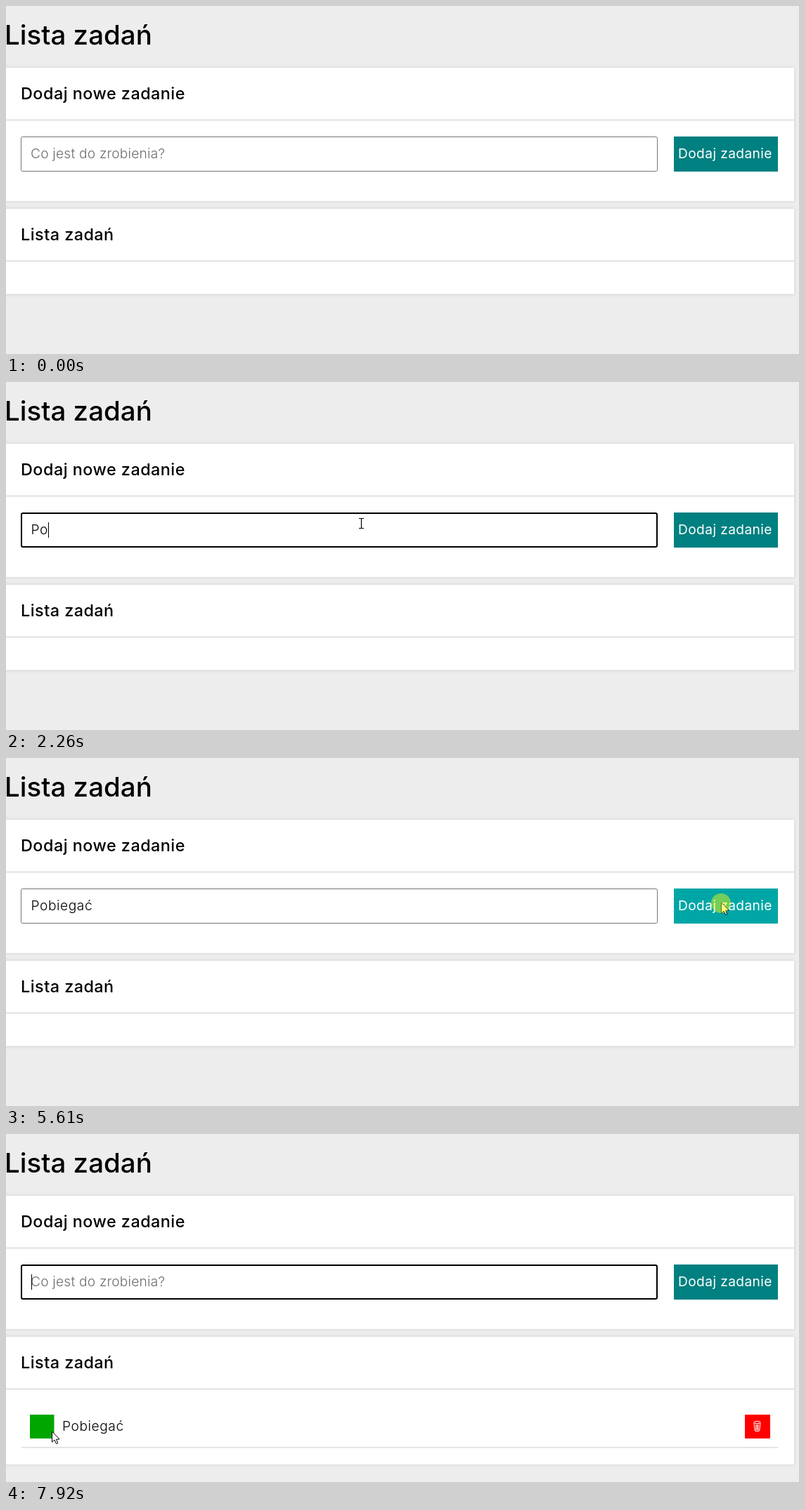
An HTML page with a canvas that plays this animation: 1128x496 px, repeating every 7990 ms.

```html
<!DOCTYPE html>
<html lang="pl">
<head>
<meta charset="utf-8">
<title>Lista zadań</title>
<style>
  html, body { margin: 0; width: 100%; height: 100%; overflow: hidden; background: #ededed; }
  canvas { display: block; }
</style>
</head>
<body>
<canvas id="stage" width="1128" height="496"></canvas>
<script>
const ctx = document.getElementById('stage').getContext('2d');
const LOOP = 7990, BLINK = 530, STEP = 1000 / 15;
const TASK = 'Pobiegać';
const FOCUS = 940, PRESS = 5550, ADDED = 5740;
const KEYS = [1930, 2260, 2860, 2990, 3190, 3320, 3520, 4120];

// Pointer moves: [time, x, y]
const MOVES = [
  [[190, 1078, 477], [400, 860, 376], [620, 600, 236], [780, 515, 188], [930, 505, 201]],
  [[4785, 505, 201], [4930, 625, 192], [5060, 830, 190], [5180, 985, 201], [5265, 1017, 206]],
  [[6600, 1017, 206], [6733, 947, 265], [7060, 590, 372], [7430, 251, 429],
   [7700, 112, 432], [7860, 70, 426], [7920, 65, 424]]
];

const FONTS = {
  title: ['500 38.5px', '0px'],
  head: ['500 23.4px', '0.47px'],
  hint: ['300 19.2px', '0.2px'],
  task: ['300 19.2px', '0.55px'],
  button: ['400 19.2px', '0.38px']
};

function setFont(name) {
  const [font, spacing] = FONTS[name];
  ctx.font = font + ' Inter, sans-serif';
  ctx.letterSpacing = spacing;
}

function text(str, x, y, font, color = '#000') {
  setFont(font);
  ctx.fillStyle = color;
  ctx.fillText(str, x, y);
}

function rect(x, y, w, h, color) {
  ctx.fillStyle = color;
  ctx.fillRect(x, y, w, h);
}

// Smooth curve through timed points
function along(points, t) {
  const last = points.length - 1;
  if (t >= points[last][0]) return points[last].slice(1);
  if (t <= points[0][0]) return points[0].slice(1);
  const i = points.findIndex(p => p[0] > t) - 1;
  const a = points[i], b = points[i + 1], dt = b[0] - a[0], u = (t - a[0]) / dt;
  const slope = (n, k) => {
    const p = points[Math.max(0, n - 1)], q = points[Math.min(last, n + 1)];
    return (q[k] - p[k]) / (q[0] - p[0]);
  };
  const u2 = u * u, u3 = u2 * u;
  return [1, 2].map(k =>
    a[k] * (2 * u3 - 3 * u2 + 1) + b[k] * (3 * u2 - 2 * u3) +
    dt * (slope(i, k) * (u3 - 2 * u2 + u) + slope(i + 1, k) * (u3 - u2)));
}

function pointerAt(t) {
  if (t < 190) return null;
  const tick = Math.floor((t + 15) / STEP) * STEP;
  const move = MOVES.filter(m => tick >= m[0][0]).pop();
  return along(move, tick).map(Math.round);
}

function inside(p, x, y, w, h) {
  return !!p && p[0] >= x && p[0] < x + w && p[1] >= y && p[1] < y + h;
}

function panel(y, h, title) {
  ctx.save();
  ctx.shadowColor = 'rgba(0,0,0,.13)';
  ctx.shadowBlur = 5;
  rect(-10, y, 1131, h, '#fff');
  ctx.restore();
  rect(0, y + 74, 1121, 1, '#ccc');
  text(title, 21, y + 45, 'head');
}

function input(t, typed) {
  const focused = (t >= FOCUS && t < PRESS) || t >= ADDED;
  ctx.beginPath();
  if (focused) ctx.roundRect(22, 187, 904, 48, 2);
  else ctx.roundRect(21.5, 186.5, 905, 49, 2);
  ctx.lineWidth = focused ? 2 : 1;
  ctx.strokeStyle = focused ? '#000' : '#767676';
  ctx.stroke();

  if (typed) text(typed, 35.5, 217, 'task');
  else text('Co jest do zrobienia?', 35, 217, 'hint', '#6c6c6c');

  const since = [FOCUS, ...KEYS, ADDED].filter(k => k <= t).pop();
  if (focused && Math.floor((t - since) / BLINK) % 2 === 0) {
    setFont('task');
    const w = typed ? ctx.measureText(typed).width : 0;
    rect(Math.round(35.6 + w), 200, 1, 22, '#000');
  }
}

function trash() {
  ctx.strokeStyle = '#fff';
  ctx.lineWidth = 1;
  ctx.beginPath();
  ctx.ellipse(1068.5, 411, 4.7, 1.6, 0, 0, Math.PI * 2);
  ctx.moveTo(1064, 412);
  ctx.lineTo(1065.3, 423);
  ctx.quadraticCurveTo(1068.5, 425, 1071.7, 423);
  ctx.lineTo(1073, 412);
  for (const x of [1066.8, 1068.5, 1070.2]) {
    ctx.moveTo(x, 414);
    ctx.lineTo(x, 422.5);
  }
  ctx.stroke();
}

function item(p) {
  rect(34, 400, 34.5, 34, inside(p, 34, 400, 35, 34) ? '#00a600' : '#008000');
  text(TASK, 80, 423, 'task');
  rect(1051, 400, 36, 34, '#f00');
  trash();
  rect(22, 446, 1076, 1.5, '#ddd');
}

function iBeam(x, y) {
  ctx.beginPath();
  ctx.moveTo(x - 3, y - 6.5);
  ctx.lineTo(x + 4, y - 6.5);
  ctx.moveTo(x + .5, y - 6.5);
  ctx.lineTo(x + .5, y + 7.5);
  ctx.moveTo(x - 3, y + 7.5);
  ctx.lineTo(x + 4, y + 7.5);
  ctx.lineWidth = 1.2;
  ctx.strokeStyle = '#000';
  ctx.stroke();
}

function arrow(x, y) {
  ctx.save();
  ctx.translate(x + .5, y);
  ctx.beginPath();
  ctx.moveTo(0, 0);
  ctx.lineTo(0, 15);
  ctx.lineTo(3.5, 12);
  ctx.lineTo(6, 17.5);
  ctx.lineTo(8.3, 16.5);
  ctx.lineTo(6, 11.2);
  ctx.lineTo(10.6, 11);
  ctx.closePath();
  ctx.fillStyle = '#fff';
  ctx.fill();
  ctx.lineWidth = 1;
  ctx.strokeStyle = '#000';
  ctx.stroke();
  ctx.restore();
}

function clickSpot(x, y) {
  ctx.beginPath();
  ctx.arc(x, y, 14, 0, Math.PI * 2);
  ctx.fillStyle = 'rgba(255,255,0,.45)';
  ctx.fill();
}

function draw(t) {
  const p = pointerAt(t), added = t >= ADDED;
  const typed = added ? '' : TASK.slice(0, KEYS.filter(k => k <= t).length);

  rect(0, 0, 1128, 496, '#ededed');
  text('Lista zadań', -2, 55, 'title');
  panel(88, 190, 'Dodaj nowe zadanie');
  panel(289, added ? 182 : 121.5, 'Lista zadań');
  input(t, typed);
  rect(950, 186, 148, 50, inside(p, 950, 186, 148, 50) ? '#00a6a6' : '#008080');
  text('Dodaj zadanie', 956, 217, 'button', '#fff');
  if (added) item(p);

  if (p) (inside(p, 22, 186, 905, 50) ? iBeam : arrow)(...p);
  if (t >= FOCUS && t < 1010) clickSpot(504, 200);
  if (t >= PRESS && t < ADDED) clickSpot(1017, 207);
}

const start = performance.now();
function frame() {
  draw((performance.now() - start) % LOOP);
  requestAnimationFrame(frame);
}
frame();
</script>
</body>
</html>
```
